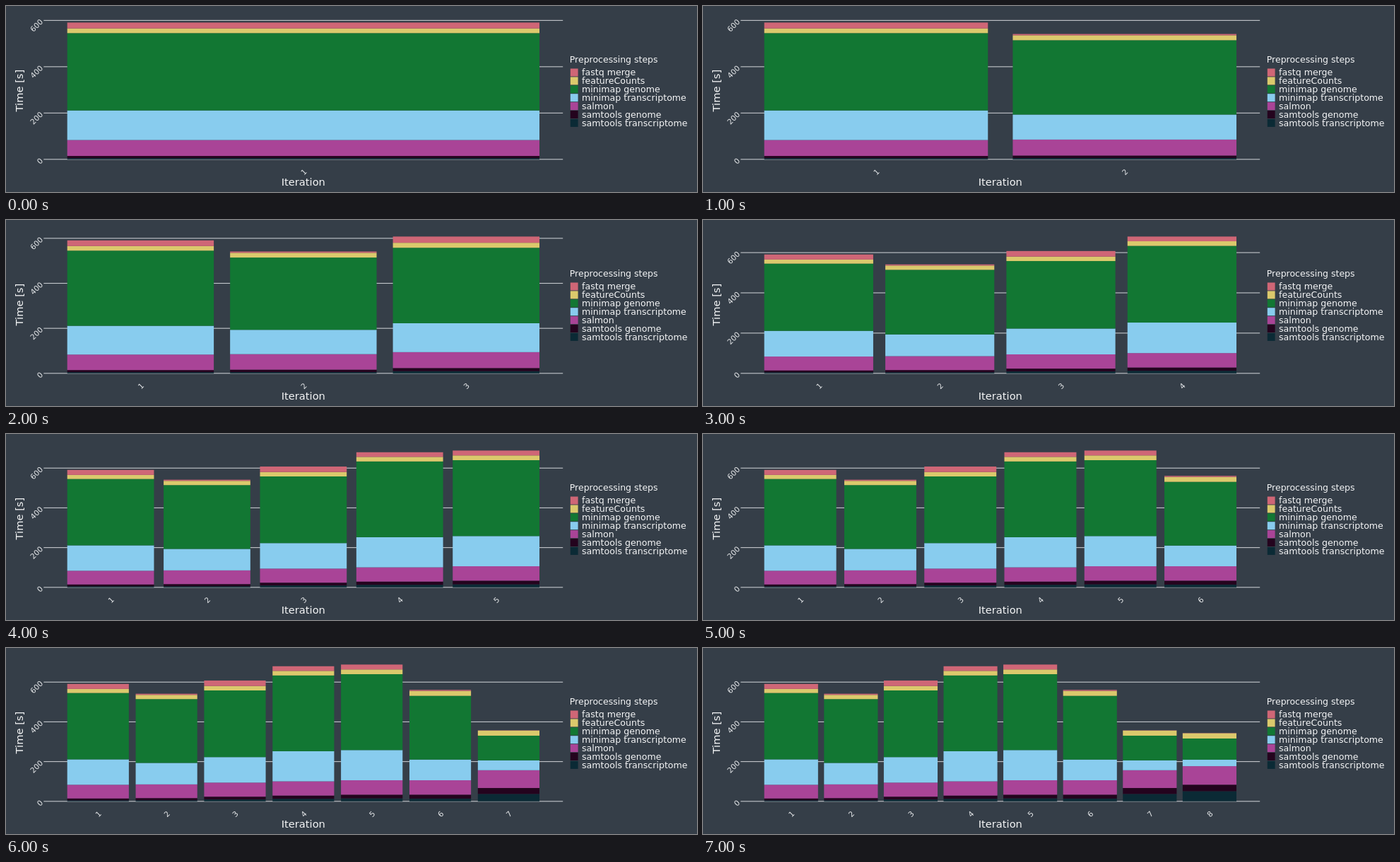
Animation, 978 px wide and 263 px high, one loop 8000 ms. Source, as an HTML page with a canvas:

```html
<!DOCTYPE html>
<html lang="en">
<head>
<meta charset="utf-8">
<title>Preprocessing time per iteration</title>
<style>
html, body { margin: 0; width: 100%; height: 100%; overflow: hidden; background: #353e48; }
canvas { display: block; }
</style>
</head>
<body>
<canvas id="chart" width="978" height="263"></canvas>
<script>
const ctx = document.getElementById('chart').getContext('2d');
const FONT = '"DejaVu Sans", sans-serif';
const LEFT = 86.7, RIGHT = 755, BASE = 216.8, HEIGHT = 193.4;
const STEP_MS = 1000, RUNS = 8;
const TEXT = '#f4f5f6', TICK = '#e6e8ea', GRID = '#c4c8cc';

// Bottom of each stack first
const steps = [
  ['samtools transcriptome', '#0b2a35'],
  ['samtools genome', '#24041e'],
  ['salmon', '#a94497'],
  ['minimap transcriptome', '#88ccee'],
  ['minimap genome', '#127733'],
  ['featureCounts', '#dbc96c'],
  ['fastq merge', '#cf6676']
];

// Seconds per step in run i: slow growth, a dip every fourth run,
// a peak in the middle and a sharp shift after the sixth run
function durations(i) {
  const dip = i % 4 === 2 ? 0.7 + 0.05 * i : 0;
  const peak = Math.abs(i - 4.5) < 1 ? 1 : 0;
  const late = power => i > 6 ? (i - 6) ** power : 0;
  return [
    3 + 2.2 * i - 2.4 * dip + peak + 18.6 * late(0.7),
    7 + 2.3 * i - dip + 7 * late(0.1),
    68 + 0.9 * i - dip + 15.2 * late(0.25),
    127.5 + 0.3 * i - 25 * dip + 23 * peak - 80 * late(0.28),
    333.3 + 0.7 * i - 17 * dip + 45 * peak - 214 * late(0.12),
    19.5 + 0.9 * i,
    Math.max(1.2, 24 + 1.2 * i - 26 * dip - 5.5 * peak - 40 * late(0))
  ];
}

const runs = Array.from({ length: RUNS }, (_, k) => durations(k + 1));
const totals = runs.map(run => run.reduce((a, b) => a + b));

function label(str, x, y, size, { angle = 0, align = 'left', dx = 0, dy = 0, color = TEXT } = {}) {
  ctx.save();
  ctx.translate(x, y);
  ctx.rotate(angle * Math.PI / 180);
  ctx.font = `${size}px ${FONT}`;
  ctx.textAlign = align;
  ctx.fillStyle = color;
  ctx.fillText(str, dx, dy);
  ctx.restore();
}

function tick(value, x, y, align, dx) {
  label(String(value), x, y, 10.5, { angle: -45, align, dx, dy: 3.8, color: TICK });
}

function drawGrid(scale) {
  for (let sec = 0; sec <= 600; sec += 200) {
    const y = BASE - sec * scale;
    ctx.fillStyle = GRID;
    ctx.fillRect(53.3, y - 0.55, 734.9, 1.1);
    tick(sec, 48, y + 2.3, 'right', 3.3);
  }
}

function drawBars(count, scale) {
  const unit = (RIGHT - LEFT) / (count - 0.1);
  const width = unit * 0.9;
  for (let i = 0; i < count; i++) {
    const x = LEFT + i * unit;
    let y = BASE;
    runs[i].forEach((sec, k) => {
      y -= sec * scale;
      ctx.fillStyle = steps[k][1];
      ctx.fillRect(x, y, width, sec * scale);
    });
    tick(i + 1, x + width / 2 + 0.5, 234.6, 'center', 0);
  }
}

function drawLegend() {
  label('Preprocessing steps', 797.8, 80, 12.5);
  steps.forEach(([name, color], k) => {
    const y = 165.4 - k * 11.9;
    ctx.fillStyle = color;
    ctx.fillRect(798.8, y - 5.5, 10.8, 11);
    label(name, 815, y + 4.4, 12.6);
  });
}

function draw(now) {
  const count = 1 + Math.floor(now / STEP_MS) % RUNS;
  const scale = HEIGHT / Math.max(...totals.slice(0, count));
  ctx.fillStyle = '#353e48';
  ctx.fillRect(0, 0, 978, 263);
  drawGrid(scale);
  drawBars(count, scale);
  label('Iteration', 420.8, 253.8, 14.67, { align: 'center' });
  label('Time [s]', 23.8, 119.6, 14.67, { angle: -90, align: 'center' });
  drawLegend();
}

const start = performance.now();
function loop() {
  draw(performance.now() - start);
  requestAnimationFrame(loop);
}
loop();
</script>
</body>
</html>
```
